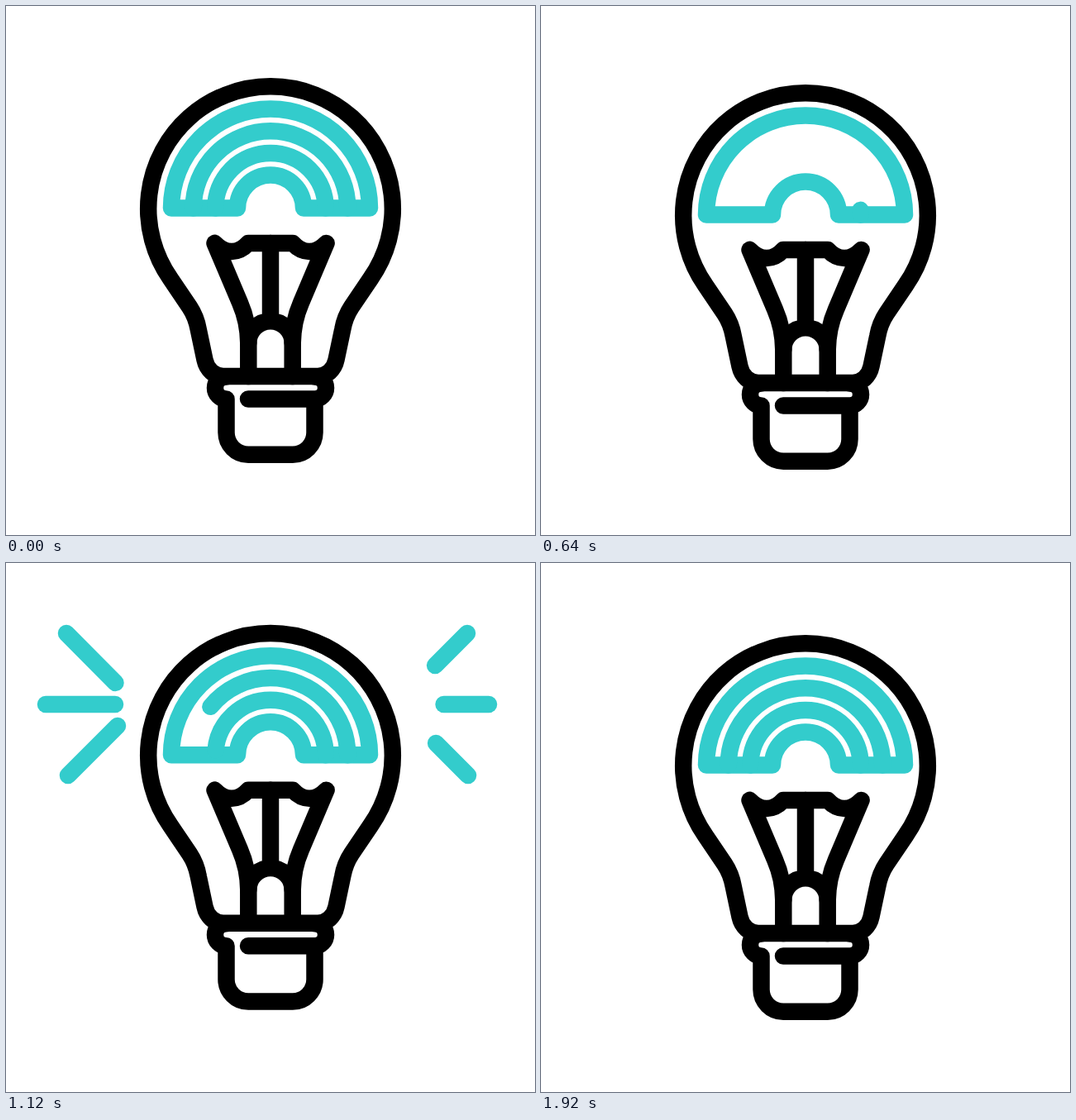
Recreate the animation shown at these times as an HTML page. Size 640 by 640 pixels, loop 2 s.

```html
<!DOCTYPE html>
<html lang="en">
<head>
<meta charset="utf-8">
<title>Light bulb</title>
<style>
  html, body { margin: 0; width: 100%; height: 100%; overflow: hidden; background: #fff; }
  svg { display: block; width: 100%; height: 100%; }
  g { fill: none; stroke-width: 20.5; stroke-linecap: round; stroke-linejoin: round; }
  .ink { stroke: #000; }
  .glow { stroke: #33cccc; }
</style>
</head>
<body>
<svg viewBox="0 0 640 640">
  <g id="bulb">
    <g class="ink">
      <!-- glass -->
      <path d="M263 448 C252 448 243 440 240.500 428 L232.700 391 Q230 376 222 364 L199 330
               A147.800 147.800 0 1 1 441 330 L418 364 Q410 376 407.300 391 L399.500 428 C397 440 388 448 377 448 Z"/>
      <!-- filament -->
      <path d="M293.300 448 V408 Q293 382 283 359 L252.500 287 Q262 297 273 297 Q284 297 293 287
               H347 Q356 297 367 297 Q378 297 387.500 287 L357 359 Q347 382 346.700 408 V448"/>
      <path d="M320 287 V381 M293.300 408 A26.700 26.700 0 0 1 346.700 408"/>
      <!-- socket -->
      <path d="M266.500 448.500 A13.500 13.500 0 0 0 266.500 475.500 V516 A26.700 26.700 0 0 0 293.200 542.700
               H346.800 A26.700 26.700 0 0 0 373.500 516 V475.500 A13.500 13.500 0 0 0 373.500 448.500 M373.500 475.500 H293"/>
    </g>
    <g class="glow">
      <path d="M200 244.600 A120 120 0 0 1 440 244.600 H360 A40 40 0 0 0 280 244.600 Z"/>
      <path class="arc" pathLength="1" d="M226.700 244.600 A93.300 93.300 0 0 1 413.300 244.600"/>
      <path class="arc" pathLength="1" d="M253.300 244.600 A66.700 66.700 0 0 1 386.700 244.600"/>
    </g>
  </g>
  <g class="glow">
    <path class="ray right" pathLength="1" d="M498 145 L558 85"/>
    <path class="ray right" pathLength="1" d="M500 171 H584"/>
    <path class="ray right" pathLength="1" d="M499 197 L559 257"/>
    <path class="ray left" pathLength="1" d="M132.500 145 L73 85"/>
    <path class="ray left" pathLength="1" d="M132 171 H48"/>
    <path class="ray left" pathLength="1" d="M135 197 L75 257"/>
  </g>
</svg>
<script>
  const LOOP = 2000, STEP = 40, DELAY = 80;
  const bulb = document.getElementById('bulb');
  const arcs = document.querySelectorAll('.arc');
  const rays = document.querySelectorAll('.ray');
  // [time, vertical offset]
  const bounce = [[0, 0], [200, 0], [480, 38.5], [920, -63], [1320, 38.5], [1680, 0], [LOOP, 0]];

  function ease(t, from, to) {
    const u = Math.min(1, Math.max(0, (t - from) / (to - from)));
    return u * u * (3 - 2 * u);
  }

  function offsetAt(t) {
    const i = bounce.findIndex(key => key[0] > t);
    const [t0, y0] = bounce[i - 1], [t1, y1] = bounce[i];
    return y0 + (y1 - y0) * ease(t, t0, t1);
  }

  // Show only the part of a path between two fractions of its length.
  function trim(path, start, end) {
    path.style.visibility = end > start ? 'visible' : 'hidden';
    path.setAttribute('stroke-dasharray', `${Math.max(0, end - start)} 2`);
    path.setAttribute('stroke-dashoffset', -start);
  }

  function trimArc(path, t) {
    if (t < 620) trim(path, ease(t, 200, 600), 1);
    else if (t < 1000) trim(path, 0, ease(t, 640, 1000));
    else if (t < 1420) trim(path, ease(t, 1000, 1400), 1);
    else trim(path, 0, ease(t, 1440, 1840));
  }

  function draw(now) {
    const t = Math.floor((now + 4) / STEP) * STEP % LOOP;
    bulb.setAttribute('transform', `translate(0 ${offsetAt(t)})`);
    arcs.forEach((arc, i) => trimArc(arc, t - i * DELAY));
    rays.forEach(ray => {
      const local = t - (ray.classList.contains('left') ? DELAY : 0);
      trim(ray, ease(local, 1040, 1240), ease(local, 840, 1040));
    });
    requestAnimationFrame(draw);
  }
  draw(0);
</script>
</body>
</html>
```
